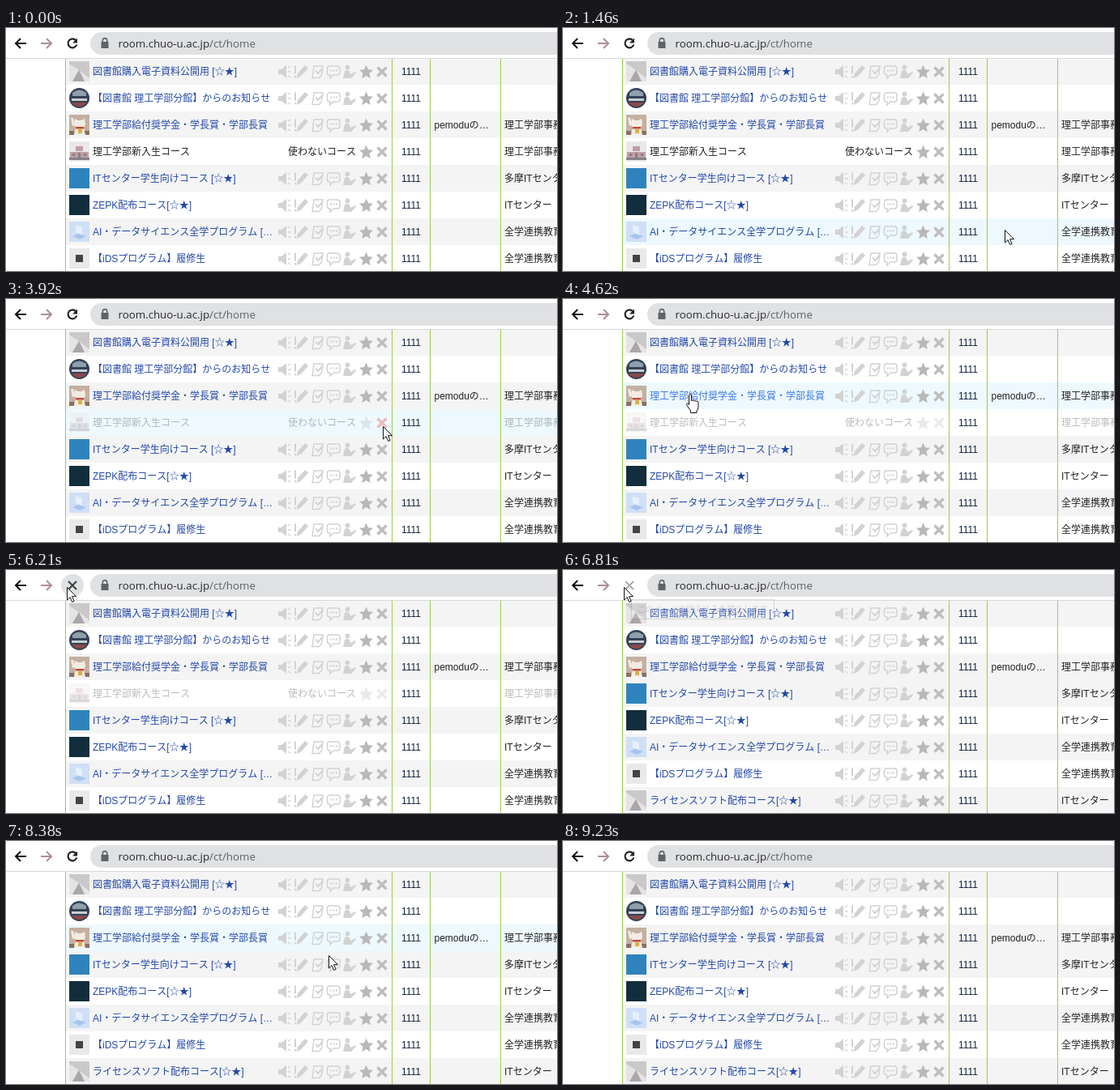
An HTML page for the animation above (9700 ms loop, 680x300 px).

```html
<!DOCTYPE html>
<html lang="ja">
<head>
<meta charset="utf-8">
<title>Course list</title>
<style>
html, body { margin: 0; width: 100%; height: 100%; overflow: hidden; background: #fff; }
svg { display: block; width: 680px; height: 300px; }
text { font: 12px "Liberation Sans", "Noto Sans CJK JP", "Noto Sans CJK", sans-serif; font-kerning: none; white-space: pre; }
.link { fill: #2448a8; }
.hot .link.over { fill: #3c78e8; }
.plain { fill: #222; }
.count { fill: #14233f; font-kerning: normal; text-anchor: middle; }
.url { font: 13.3px "Open Sans", "Noto Sans", sans-serif; fill: #26282b; }
.tip { font-size: 11px; letter-spacing: -.95px; fill: #444; }
</style>
</head>
<body>
<svg viewBox="0 0 680 300">
  <defs>
    <g id="tools" fill="#d2d2d2" stroke="#d2d2d2" stroke-width="0">
      <path d="M336 14h4l6-5v16l-6-5h-4z"/>
      <path d="M348 12l3-2M348 17h3.500M348 22l3 2" stroke-width="1.400"/>
      <path d="M357 9.500v10M357 22v2.500" stroke-width="2"/>
      <path d="M358.500 25l1.500-6 9-10 4 3.500-9 10z"/>
      <path d="M380 10h11l-1.500 11-3 3.500h-8.500l.5-3z" fill="none" stroke-width="1.500"/>
      <path d="M382 15.500l3 3.500 6-6.500" fill="none" stroke-width="1.900"/>
      <path d="M399 10h10q3 0 3 3v5q0 3-3 3h-5l-4 4v-4h-1q-2.500 0-2.500-3v-5q0-3 2.500-3z" fill="none" stroke-width="1.500"/>
      <path d="M400 15.500h2M403.500 15.500h2M407 15.500h2" stroke-width="2"/>
      <circle cx="421.500" cy="11.500" r="2.900"/>
      <path d="M416 25l2-9q3-2 5.500 0l2 4 5.500-3 1 1.500-6 6.500z"/>
    </g>
    <path id="star" fill="#b8b8b8" d="M444.500 8.500l2.500 5.700 6 .6-4.500 4.200 1.300 6.200-5.300-3.200-5.300 3.200 1.300-6.200-4.500-4.200 6-.6z"/>
    <path id="cross" d="M458.500 11.500l11 11M469.500 11.500l-11 11" stroke-width="3.300"/>
    <g id="fan">
      <path fill="#cbc8ca" d="M0 0h25v25H0z"/>
      <path fill="#e6e3e5" d="M12 11L0 3v22h4zM12 11l13 10v4h-6z"/>
      <path fill="#aaa6a9" d="M12 11L4 25h15z"/>
    </g>
    <g id="library">
      <circle cx="12.500" cy="12.500" r="12.500" fill="#344257"/>
      <path fill="#8fa0ad" d="M4 6q8-7 17 0v4H4z"/>
      <path fill="#c9ced2" d="M3 13h19v3H3z"/>
      <path fill="#8c4a48" d="M3 18h19q-4 5-9.500 5T3 18z"/>
    </g>
    <g id="cat">
      <path fill="#c4b0a0" d="M0 0h25v25H0z"/>
      <path fill="#8a6f62" d="M0 20h6v5H0zM19 20h6v5h-6z"/>
      <path fill="#f3ece2" d="M6 11l1-6 4 2h4l4-2 1 7-2 4 2 9H6l2-9zM2 4h3l2 9-3 1z"/>
      <path fill="#c2483c" d="M8 15h10v2.500H8z"/>
      <path fill="#d9b24c" d="M11 18h5v5h-5z"/>
    </g>
    <g id="campus">
      <path fill="#ebe8ea" d="M0 0h25v25H0z"/>
      <path fill="#bf9fa3" d="M8 6h9v6H8zM1 13h23v7H1z"/>
      <path fill="#858088" d="M0 20h25v3H0zM11 14h3v6h-3zM4 15h3v3H4zM18 15h3v3h-3z"/>
    </g>
    <path id="info" fill="#2f83bd" d="M0 0h25v25H0z"/>
    <path id="guard" fill="#122d3c" d="M0 0h25v25H0z"/>
    <g id="data">
      <path fill="#cfdff6" d="M0 0h25v25H0z"/>
      <path fill="#a9c4ec" d="M4 18l7-3 10 3-8 4z"/>
      <path fill="#e6effb" d="M8 4l8 3v9l-8-3z"/>
    </g>
    <g id="program">
      <path fill="#e9e9e9" d="M0 0h25v25H0z"/>
      <path fill="#444" d="M8 8h9v9H8z"/>
    </g>
  </defs>

  <g id="rows"></g>
  <path d="M73.500 38V300M476.500 38V300M523.500 38V300M610.500 38V300" stroke="#9ccb4c"/>

  <path fill="#fff" d="M0 0h680v38H0z"/>
  <path stroke="#d6d8da" d="M0 37.500h680"/>
  <rect x="104" y="5" width="620" height="28" rx="14" fill="#e0e1e2"/>
  <g fill="none" stroke-width="2">
    <path stroke="#111" d="M25 19H12.500M18 13l-6 6 6 6"/>
    <path stroke="#ab8f95" d="M43 19h12.500M50 13l6 6-6 6"/>
  </g>
  <circle id="halo" cx="82" cy="19" r="14" fill="#e0e1e2"/>
  <g id="reload">
    <path fill="none" stroke="#222" stroke-width="2.200" d="M86.200 15.200A5.500 5.500 0 1 0 87.300 20.500"/>
    <path fill="#222" d="M88 12.500v6h-6z"/>
  </g>
  <path id="stop" stroke-width="2" d="M77 14l10 10M87 14L77 24"/>
  <path fill="#5f6368" d="M117.500 17h9v8h-9z"/>
  <path fill="none" stroke="#5f6368" stroke-width="1.600" d="M119.300 17.500v-2.200a2.700 2.700 0 0 1 5.400 0v2.200"/>
  <text class="url" x="138.500" y="24">room.chuo-u.ac.jp<tspan fill="#5c6065">/ct/home</tspan></text>

  <g id="tip">
    <rect x="84.500" y="36.500" width="176" height="24" fill="#fff" stroke="#444"/>
    <text class="tip" x="91.500" y="53">このページの読み込みを停止します</text>
  </g>

  <g id="pointer" fill="#fff" stroke="#111" stroke-linejoin="round">
    <path id="arrow" d="M.5.500v15.500l3.600-3.400 2.600 5.900 2.400-1-2.600-5.800h5z"/>
    <path id="hand" d="M-1.500 1.500q1.500-2 3 0v7q1.500-1.500 3 .3 1.500-1 2.700.5 2-1 2.800 1v6q0 3-2 4.700v2.500h-7.500v-2.500l-5-7.500q0-2 2-1.200l1 1.200z"/>
  </g>
</svg>
<script>
const LOOP = 9700, TOP = 37, PITCH = 33, STEP = 70, REMOVED = 3;
const FADE = 2910, STOP = 6210, SWAP = 6740, LEAVE = 7490;
const $ = id => document.getElementById(id);

// thumbnail, course name, note, owner
const courses = [
  ["fan", "図書館購入電子資料公開用 [☆★]", "", ""],
  ["library", "【図書館 理工学部分館】からのお知らせ", "", ""],
  ["cat", "理工学部給付奨学金・学長賞・学部長賞", "pemoduの…", "理工学部事務室"],
  ["campus", "理工学部新入生コース", "", "理工学部事務室"],
  ["info", "ITセンター学生向けコース [☆★]", "", "多摩ITセンター"],
  ["guard", "ZEPK配布コース[☆★]", "", "ITセンター"],
  ["data", "AI・データサイエンス全学プログラム […", "", "全学連携教育機構"],
  ["program", "【iDSプログラム】履修生", "", "全学連携教育機構"],
  ["fan", "ライセンスソフト配布コース[☆★]", "", "ITセンター"]
];

const label = (x, cls, s) => `<text x="${x}" y="21" class="${cls}">${s}</text>`;

$("rows").innerHTML = courses.map(([thumb, name, note, owner], i) => {
  const unused = i === REMOVED;
  return `<g><rect x="74" width="606" height="${PITCH}"/><g>
    <use href="#${thumb}" x="78" y="4"/>
    ${label(107, unused ? "plain" : "link", name)}
    ${unused ? label(348, "plain", "使わないコース") : '<use href="#tools"/>'}
    <use href="#star"/><use href="#cross" class="cross"/>
    ${label(528.5, "plain", note)}${label(615, "plain", owner)}</g>
    ${label(500, "count", "1111")}</g>`;
}).join("");

const rows = [...$("rows").children].map((el, i) => ({
  el, i,
  back: el.firstElementChild,
  body: el.children[1],
  name: el.querySelector("text"),
  cross: el.querySelector(".cross")
}));

// pointer path: time, x, y
const path = [
  [1110, 590, 320], [2090, 480, 158], [2510, 470, 157], [3850, 470, 157],
  [4620, 157, 117], [4830, 99, 67], [5250, 75, 21], [7360, 75, 21],
  [8330, 398, 141], [9170, 470, 320]
];

const slope = (i, c) => (path[i + 1][c] - path[i][c]) / (path[i + 1][0] - path[i][0]);

function tangent(i, c) {
  if (i === 0 || i === path.length - 1) return slope(Math.max(0, i - 1), c);
  const a = slope(i - 1, c), b = slope(i, c);
  return a * b <= 0 ? 0 : 2 * a * b / (a + b);
}

// monotone cubic through the path points
function pointerAt(t) {
  const last = path.length - 1;
  if (t <= path[0][0]) return path[0].slice(1);
  if (t >= path[last][0]) return path[last].slice(1);
  const i = path.findIndex(p => p[0] > t) - 1;
  const span = path[i + 1][0] - path[i][0], u = (t - path[i][0]) / span;
  return [1, 2].map(c => {
    const a = path[i][c], b = path[i + 1][c];
    return a + (b - a) * u * u * (3 - 2 * u)
      + span * u * (1 - u) * (tangent(i, c) * (1 - u) - tangent(i + 1, c) * u);
  });
}

// the screen is sampled in steps
function snap(t) {
  const base = t < 3920 ? 1180 : t < 7420 ? 3920 : 7420;
  return base + Math.floor((t + 5 - base) / STEP) * STEP;
}

const show = (el, on) => el.setAttribute("visibility", on ? "visible" : "hidden");

function draw(t) {
  const now = snap(t), swapped = t >= SWAP;
  const [x, y] = pointerAt(now);
  const [hx, hy] = pointerAt(now - STEP); // hover trails the pointer by one step
  let hand = false;

  for (const { el, i, back, body, name, cross } of rows) {
    const top = TOP + PITCH * (swapped && i > REMOVED ? i - 1 : i);
    const gone = swapped && i === REMOVED;
    const hot = !gone && hy >= 38 && hy >= top && hy < top + PITCH && hx >= 74;
    const over = hot && i !== REMOVED && hx >= 107 && hx < 107 + name.getComputedTextLength();
    hand = hand || over;
    el.setAttribute("transform", `translate(0 ${top})`);
    el.setAttribute("display", gone ? "none" : "inline");
    el.classList.toggle("hot", hot);
    name.classList.toggle("over", over);
    back.setAttribute("fill", hot ? "#edf9fe" : i % 2 ? "#fff" : "#f4f4f4");
    cross.setAttribute("stroke", hot && hx > 456 && hx < 474 ? "#e5342f" : "#bdbdbd");
    if (i === REMOVED) body.setAttribute("opacity", t < FADE ? 1 : t < FADE + STEP ? .65 : .3);
  }

  const stopping = t >= STOP && t < LEAVE;
  show($("halo"), t >= 5310 && t < SWAP);
  show($("reload"), !stopping);
  show($("stop"), stopping);
  $("stop").setAttribute("stroke", swapped ? "#aaa" : "#3c4043");
  show($("tip"), t >= SWAP + STEP && t < LEAVE);
  $("tip").setAttribute("opacity", Math.min(1, Math.max(0, (t - SWAP) / 420)));

  $("pointer").setAttribute("transform", `translate(${Math.round(x)} ${Math.round(y)})`);
  show($("arrow"), !hand);
  show($("hand"), hand);
}

const start = performance.now();
function tick() {
  draw((performance.now() - start) % LOOP);
  requestAnimationFrame(tick);
}
tick();
</script>
</body>
</html>
```
